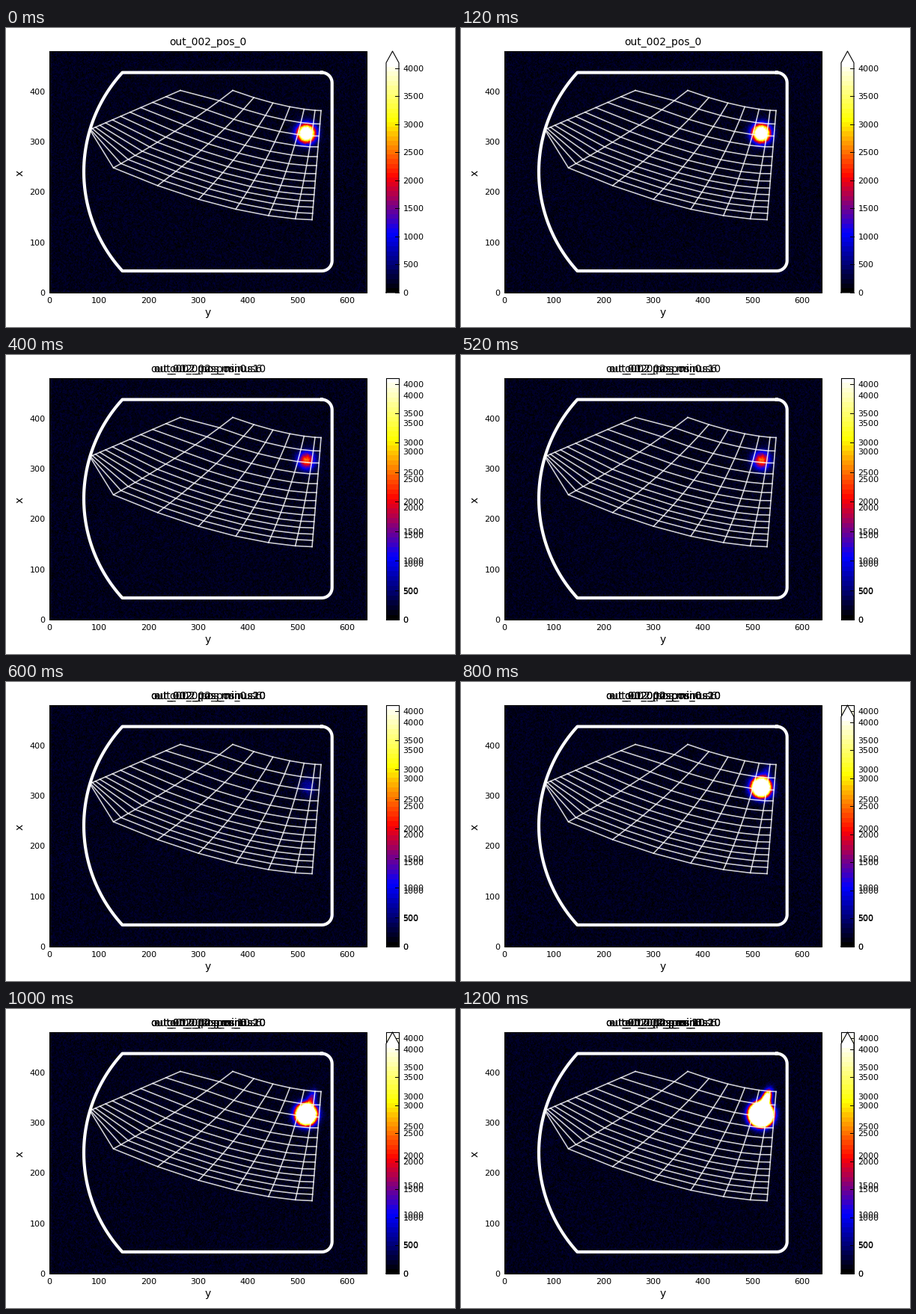
Recreate the animation shown at these times as a matplotlib script. Size 600 by 400 pixels, loop 1400 ms.

```python
import numpy as np
import matplotlib.pyplot as plt
from matplotlib.animation import FuncAnimation
from matplotlib.colors import BoundaryNorm, LinearSegmentedColormap

W, H, DPI = 600, 400, 100
LEFT, RIGHT, TOP, BOTTOM = 58, 482, 31, 354
BAR_LEFT, BAR_RIGHT, CONE_BASE = 508, 525, 46.5
FULL = 4096
LEVELS = np.linspace(0, FULL, 51)
POSITIONS = [0, -6, -10, -20, 6, 10, 20]

plt.rcParams["font.family"] = "DejaVu Sans"
cmap = LinearSegmentedColormap.from_list(
    "heat", ["black", "blue", "red", "yellow", "white"], N=256)
norm = BoundaryNorm(LEVELS, cmap.N)

fig = plt.figure(figsize=(W / DPI, H / DPI), dpi=DPI, facecolor="white")
ax = fig.add_axes([0, 0, 1, 1])


def label(x, y, text, size=8, ha="center", va="center_baseline", **kw):
    return ax.text(x, y, text, fontsize=size, ha=ha, va=va, **kw)


def line(xs, ys, color="black", lw=0.7, **kw):
    return ax.plot(xs, ys, color=color, lw=lw, **kw)[0]


# Camera image
nx, ny = 320, 240
px, py = np.meshgrid(LEFT + (np.arange(nx) + 0.5) * (RIGHT - LEFT) / nx,
                     TOP + (np.arange(ny) + 0.5) * (BOTTOM - TOP) / ny)


def blob(cx, cy, rx, ry, tilt=0):
    dx, dy = px - cx, py - cy
    u = dx * np.cos(tilt) + dy * np.sin(tilt)
    v = dy * np.cos(tilt) - dx * np.sin(tilt)
    return np.exp(-(u / rx) ** 2 - (v / ry) ** 2)


spot = blob(401, 141, 11, 11)
halo = blob(406, 140, 8, 14)
tail = blob(408, 120, 5.5, 11, 0.36)


def spot_peak(pos):
    return 7500 * np.exp(0.075 * pos) - 1350


def camera(pos):
    rng = np.random.default_rng(pos + 100)
    light = spot_peak(pos) * spot + 250 * halo
    light += 14 * max(pos, 0) ** 2 * tail
    light *= rng.normal(1, 0.05, light.shape)
    return np.clip(light + rng.normal(150, 65, light.shape), 0, FULL - 1)


image = ax.imshow(camera(0), cmap=cmap, norm=norm, aspect="auto",
                  interpolation="bilinear", extent=[LEFT, RIGHT, BOTTOM, TOP])
line([LEFT, RIGHT, RIGHT, LEFT, LEFT], [TOP, TOP, BOTTOM, BOTTOM, TOP], lw=0.8)

for v in range(0, 601, 100):
    label(LEFT + v * (RIGHT - LEFT) / 640, 359.5, v, va="top")
for v in range(0, 401, 100):
    label(52.4, BOTTOM - v * (BOTTOM - TOP) / 480, v, ha="right")
label(270, 380.5, "y", 10, va="center")
label(18.5, 194, "x", 10, va="center", rotation=90)


# Sight-line mesh: every edge runs between two key points with an ease-out
def ease(start, end, s, power):
    return end + (start - end) * (1 - s) ** power


def mesh_column(s, rows=14):
    top = np.array([ease(303, 421, s, 1.5), ease(83.5, 110.5, s, 2.4)])
    foot = np.array([ease(143.5, 409, s, 1.38), ease(187, 256.5, s, 2.3)])
    u = np.linspace(0, 1, rows)
    f = u + (0.55 - 0.1 * s) * u * (1 - u) * (1.5 - u)
    column = top + f[:, None] * (foot - top)
    column[:, 0] += 28 * f * (1 - f) * (1 - s ** 2)
    return column


columns = [mesh_column(s) for s in np.linspace(0, 1, 7)]
u = np.linspace(0, 1, 13)
fan = np.column_stack([ease(233, 112, u, 2), ease(83.5, 136, u, 2)])
rows = np.array(columns).transpose(1, 0, 2)
mesh = columns + [fan, rows[0]]
mesh += [np.vstack([start, row]) for start, row in zip(fan, rows[1:])]
for path in mesh:
    line(*path.T, color="white", lw=1.15, alpha=0.82)

# Vessel outline
turn = np.linspace(0, np.pi / 2, 12)
half = np.arcsin(132.7 / 196.8)
bow = np.linspace(-half, half, 60)
xs = np.concatenate([422 + 13.7 * np.sin(turn), 422 + 13.7 * np.cos(turn),
                     300.8 - 196.8 * np.cos(bow), [422]])
ys = np.concatenate([73.3 - 13.7 * np.cos(turn), 311.3 + 13.7 * np.sin(turn),
                     192.3 - 196.8 * np.sin(bow), [59.6]])
line(xs, ys, color="white", lw=3)


# Colour bars: one plain, one ending in a cone
def color_bar(top, z):
    middle = (LEVELS[:-1, None] + LEVELS[1:, None]) / 2
    parts = [ax.imshow(middle, cmap=cmap, norm=norm, aspect="auto",
                       origin="lower", zorder=z, interpolation="nearest",
                       extent=[BAR_LEFT, BAR_RIGHT, BOTTOM, top])]
    tip_x = [BAR_LEFT, (BAR_LEFT + BAR_RIGHT) / 2, BAR_RIGHT]
    tip_y = [top, TOP, top]
    parts += ax.fill(tip_x, tip_y, "white", zorder=z)
    parts.append(line([BAR_LEFT] + tip_x + [BAR_RIGHT, BAR_LEFT],
                      [BOTTOM] + tip_y + [BOTTOM, BOTTOM], lw=0.8, zorder=z + 1))
    texts = []
    for v in range(0, 4001, 500):
        y = BOTTOM - v * (BOTTOM - top) / FULL
        parts.append(line([BAR_RIGHT - 5.5, BAR_RIGHT], [y, y], zorder=z + 1))
        texts.append(label(530.5, y, v, ha="left"))
    return parts, texts


plain, plain_texts = color_bar(TOP, 4)
cone, _ = color_bar(CONE_BASE, 6)

titles = [label(270, 22.9, f"out_002_pos_{pos}".replace("-", "minus"), 10,
                va="baseline") for pos in POSITIONS]

ax.set_xlim(0, W)
ax.set_ylim(H, 0)
ax.axis("off")


def show(artists, on):
    for artist in artists:
        artist.set_visible(on)


def draw(i):
    pos = POSITIONS[i]
    image.set_data(camera(pos))
    show(plain + plain_texts, i > 0)
    show(cone, spot_peak(pos) > FULL)
    # Titles pile up through the loop
    show(titles[:i + 1], True)
    show(titles[i + 1:], False)
    return []


anim = FuncAnimation(fig, draw, frames=len(POSITIONS), interval=200,
                     repeat=True, repeat_delay=0, blit=False)
plt.show()
```
